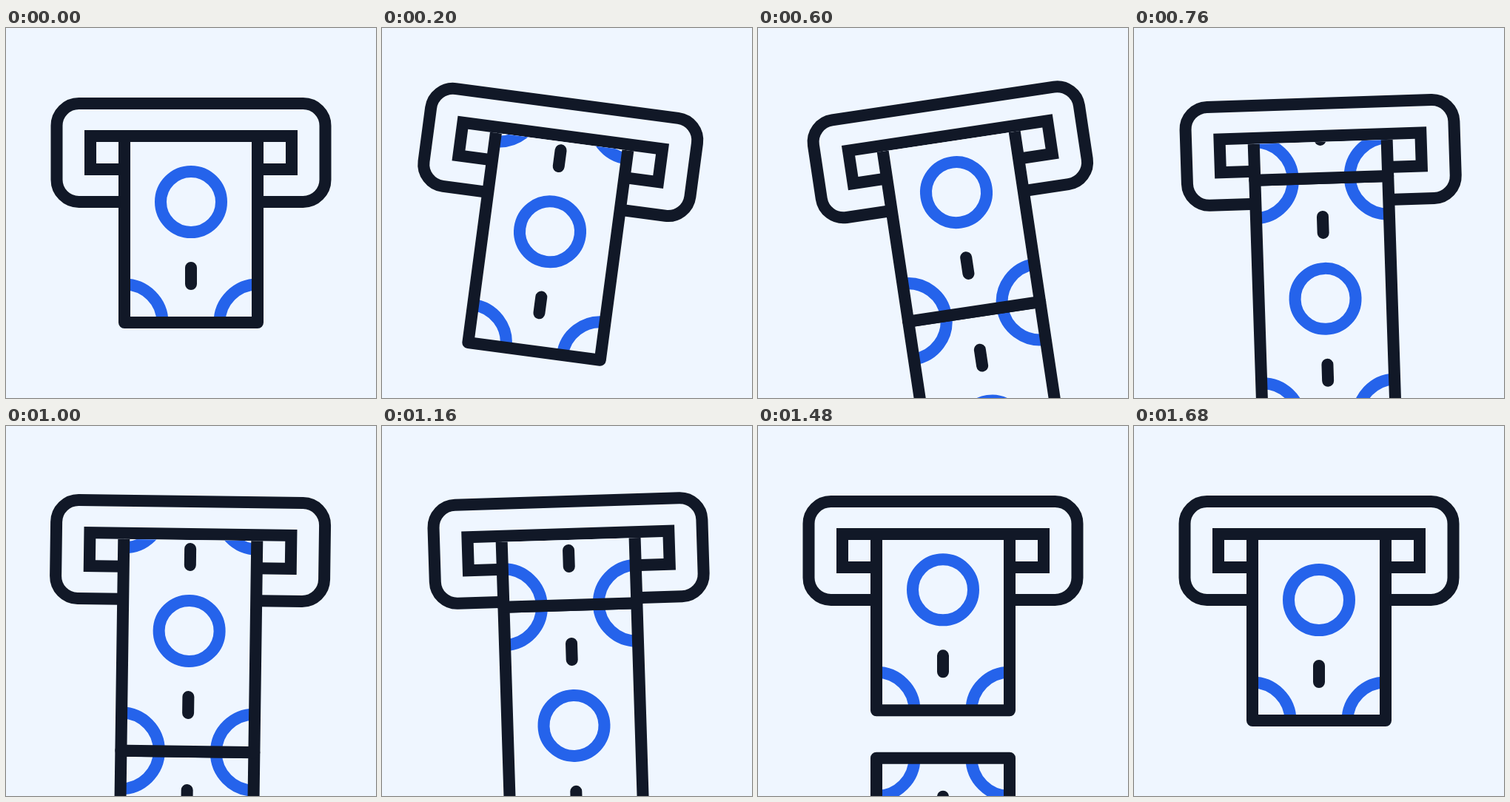
Recreate the animation shown at these times as an HTML page. Size 500x500 px, loop 2000 ms.

```html
<!DOCTYPE html>
<html lang="en">
<head>
<meta charset="utf-8">
<title>Cash dispenser</title>
<style>
  html, body { margin: 0; width: 100%; height: 100%; overflow: hidden; background: #eff6ff; }
  svg { display: block; width: 100%; height: 100%; }
  .ink { fill: none; stroke: #111827; stroke-width: 16; }
  .blue { fill: none; stroke: #2563eb; stroke-width: 16; }
</style>
</head>
<body>
<svg viewBox="0 0 500 500">
  <defs>
    <clipPath id="belowSlot"><rect x="0" y="154" width="500" height="900"/></clipPath>
    <!-- One banknote; its bottom edge lies on y = 0 -->
    <g id="note">
      <rect x="160" y="-326" width="180" height="326" fill="#eff6ff"/>
      <path class="blue" d="M160-51.5A51.5 51.5 0 0 1 211.5 0M340-51.5A51.5 51.5 0 0 0 288.5 0
        M160-274.5A51.5 51.5 0 0 0 211.5-326M340-274.5A51.5 51.5 0 0 1 288.5-326"/>
      <circle class="blue" cx="250" cy="-163" r="41"/>
      <path class="ink" stroke-linecap="round" d="M250-74v22M250-274v22"/>
      <rect class="ink" stroke-linejoin="round" x="160" y="-326" width="180" height="326"/>
    </g>
  </defs>
  <g id="machine">
    <rect class="ink" x="68.5" y="102" width="363" height="133" rx="30"/>
    <rect class="ink" x="114" y="146" width="272" height="45"/>
    <g id="notes" clip-path="url(#belowSlot)">
      <use href="#note"/><use href="#note"/><use href="#note"/><use href="#note"/>
    </g>
  </g>
</svg>
<script>
const LOOP = 2000, END = 1680, STEP = 40, NOTE = 326;
const machine = document.getElementById('machine');
const notes = [...document.querySelectorAll('#notes use')];

// Keys: [time, value, speed]
const swing = [[0, 0, 0], [295, 10, 0], [645, -9.4, 0], [870, 5.2, 0], [1100, -2.2, 0], [1320, 0, 0]];
const feed = [[0, 0, 0], [400, 150.6, .67], [600, 314.5, .86], [760, 457, .93],
  [1000, 694, .87], [1320, 916.5, .45], [END, 3 * NOTE, 0]];

// Cubic Hermite curve through the keys
function curve(keys, t) {
  const i = keys.findIndex(k => k[0] > t);
  if (i < 0) return keys[keys.length - 1][1];
  const [t0, a, va] = keys[i - 1], [t1, b, vb] = keys[i];
  const d = t1 - t0, u = (t - t0) / d, w = 1 - u;
  return a + (b - a) * u * u * (3 - 2 * u) + d * u * w * (va * w - vb * u);
}

function draw(now) {
  const t = Math.min(Math.floor(now % LOOP / STEP) * STEP, END);
  const drop = NOTE * Math.max(0, (t - 1320) / 360) ** 2;
  const travel = curve(feed, t);
  machine.setAttribute('transform', `rotate(${curve(swing, t)} 250 102)`);
  notes.forEach((note, i) => {
    const y = 398 + travel - NOTE * i + (i < 3 ? drop : 0);
    note.setAttribute('transform', `translate(0 ${y})`);
  });
}

let start;
function tick(now) {
  start ??= now;
  draw(now - start);
  requestAnimationFrame(tick);
}
draw(0);
requestAnimationFrame(tick);
</script>
</body>
</html>
```
